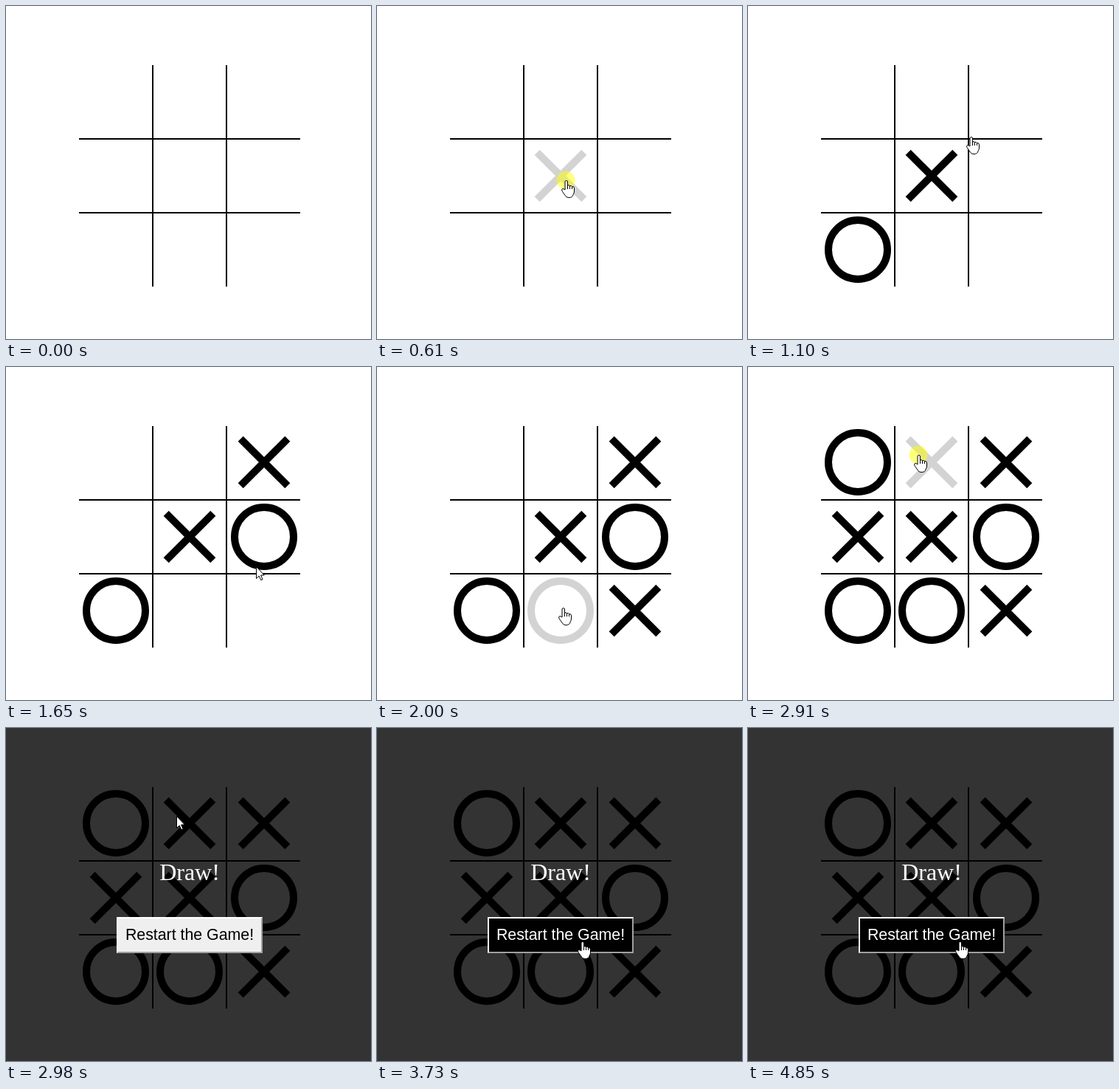
Animation, 495 px wide and 451 px high, one loop 4920 ms. Source, as an HTML page:

```html
<!DOCTYPE html>
<html lang="en">
<head>
<meta charset="utf-8">
<title>Tic-tac-toe</title>
<style>
  html, body { margin: 0; width: 100%; height: 100%; overflow: hidden; background: #fff; }
  svg { display: block; }
  .mark { fill: none; stroke: #000; stroke-width: 10; }
  .ghost { stroke: #d3d3d3; }
  .cursor { fill: #fff; stroke: #000; stroke-linejoin: round; }
  text { text-anchor: middle; }
  #title { font: 32px "Liberation Serif", "Times New Roman", serif; fill: #fff; }
  #label { font: 21.33px "Liberation Sans", Arial, sans-serif; fill: #000; }
  #face { fill: #efefef; }
  .hover #face { fill: #000; }
  .hover #label { fill: #fff; }
</style>
</head>
<body>
<svg width="495" height="451" viewBox="0 0 495 451">
  <path d="M199 80V380M299 80V380M99 180H399M99 280H399" stroke="#000" stroke-width="2"/>
  <g id="marks"></g>
  <g id="overlay">
    <rect width="495" height="451" fill="#000" fill-opacity=".8"/>
    <text id="title" x="249" y="206">Draw!</text>
    <rect x="150" y="256" width="198" height="49" fill="#a0a0a0"/>
    <path d="M150 305V256H348L346 258H152V303Z" fill="#fff"/>
    <rect id="face" x="152" y="258" width="194" height="45"/>
    <text id="label" x="249" y="287">Restart the Game!</text>
  </g>
  <g id="pointer">
    <circle id="click" r="12.5" fill="#ff0" fill-opacity=".5"/>
    <path id="arrow" class="cursor" d="M.5 .5V16.5L4.2 13L6.8 18.7L9 17.7L6.6 12H11.3Z"/>
    <g id="hand" class="cursor" transform="translate(.5 0)">
      <path d="M-1.5 13V2Q-1.5 .5 .3 .5Q2 .5 2 2V7Q3.5 6 5 7.5Q6.8 6.8 8 8.5Q11 8 11 11V15Q11 17.500 9.500 19.500Q9 23.500 3.500 23.500Q0 23.500 -1 21L-5 15.500Q-7 12.500 -5 11.500Q-3.500 11.200 -1.500 13Z"/>
      <path d="M2 7V12M5 7.5V12M8 8.5V12" fill="none"/>
    </g>
  </g>
</svg>
<script>
const LOOP = 4920, START = 330, TICK = 70;
const COLS = [149, 249, 350], ROWS = [129, 230, 330];
const ORDER = [4, 6, 2, 5, 8, 7, 3, 0, 1];

// x, y, state, hold; a: arrow, h: hand, g: ghost mark, c: click, p: placed, b: on button
const STEPS = [
  [392, 396, 'a'], [366, 346, 'h'], [310, 288, 'h'], [264, 244, 'g'], [256, 236, 'c'],
  [255, 236, 'p'], [214, 280, 'a'], [160, 320, 'g'], [152, 324, 'c'], [153, 323, 'p'],
  [222, 262, 'h'], [302, 177, 'h'], [340, 142, 'g'], [345, 140, 'c'], [345, 144, 'p'],
  [343, 200, 'g'], [342, 226, 'c'], [341, 232, 'p', 130], [339, 270, 'a'], [339, 312, 'g'],
  [338, 320, 'c'], [334, 322, 'p'], [309, 326, 'a'], [252, 326, 'g'], [234, 322, 'c'],
  [228, 316, 'p'], [190, 274, 'a'], [140, 234, 'g'], [132, 226, 'c'], [134, 218, 'p'],
  [146, 144, 'g'], [150, 122, 'c'], [152, 121, 'p'], [182, 120, 'a'], [218, 119, 'g'],
  [230, 119, 'g'], [231, 119, 'c'], [231, 119, 'p', 200],
  [246, 144, 'a'], [294, 220, 'a'], [352, 290, 'a'], [378, 316, 'a'], [340, 308, 'a'],
  [298, 293, 'b', 130], [280, 288, 'b'], [278, 289, 'b', 1120], [287, 289, 'b']
];

const $ = id => document.getElementById(id);
const show = (id, on) => { $(id).style.display = on ? '' : 'none'; };

const marks = ORDER.map((cell, turn) => {
  const el = document.createElementNS('http://www.w3.org/2000/svg', 'path');
  const x = COLS[cell % 3], y = ROWS[Math.floor(cell / 3)];
  const arm = 45 * Math.SQRT1_2;
  const cross = `M${-arm} ${-arm}L${arm} ${arm}M${arm} ${-arm}L${-arm} ${arm}`;
  el.setAttribute('d', turn % 2 ? 'M-40 0a40 40 0 1 1 80 0a40 40 0 1 1 -80 0Z' : cross);
  el.setAttribute('transform', `translate(${x} ${y})`);
  $('marks').append(el);
  return el;
});

let time = START, placed = 0;
const frames = [{ at: 0, state: '', placed: 0 }];
for (const [x, y, state, hold = TICK] of STEPS) {
  if (state === 'p') placed++;
  frames.push({ at: time, x, y, state, placed });
  time += hold;
}

function draw({ x = 0, y = 0, state, placed }) {
  const ghost = state === 'g' || state === 'c';
  marks.forEach((el, i) => {
    const next = ghost && i === placed;
    el.style.display = i < placed || next ? '' : 'none';
    el.setAttribute('class', next ? 'mark ghost' : 'mark');
  });
  show('overlay', placed === ORDER.length);
  $('overlay').setAttribute('class', state === 'b' ? 'hover' : '');
  show('pointer', state);
  show('click', state === 'c');
  show('arrow', state === 'a' || state === 'p');
  show('hand', ghost || state === 'h' || state === 'b');
  $('pointer').setAttribute('transform', `translate(${x} ${y})`);
}

const begin = performance.now();
let current;
function tick() {
  const t = Math.max(0, performance.now() - begin) % LOOP;
  const frame = frames.filter(f => f.at <= t).pop();
  if (frame !== current) draw(current = frame);
  requestAnimationFrame(tick);
}
tick();
</script>
</body>
</html>
```
